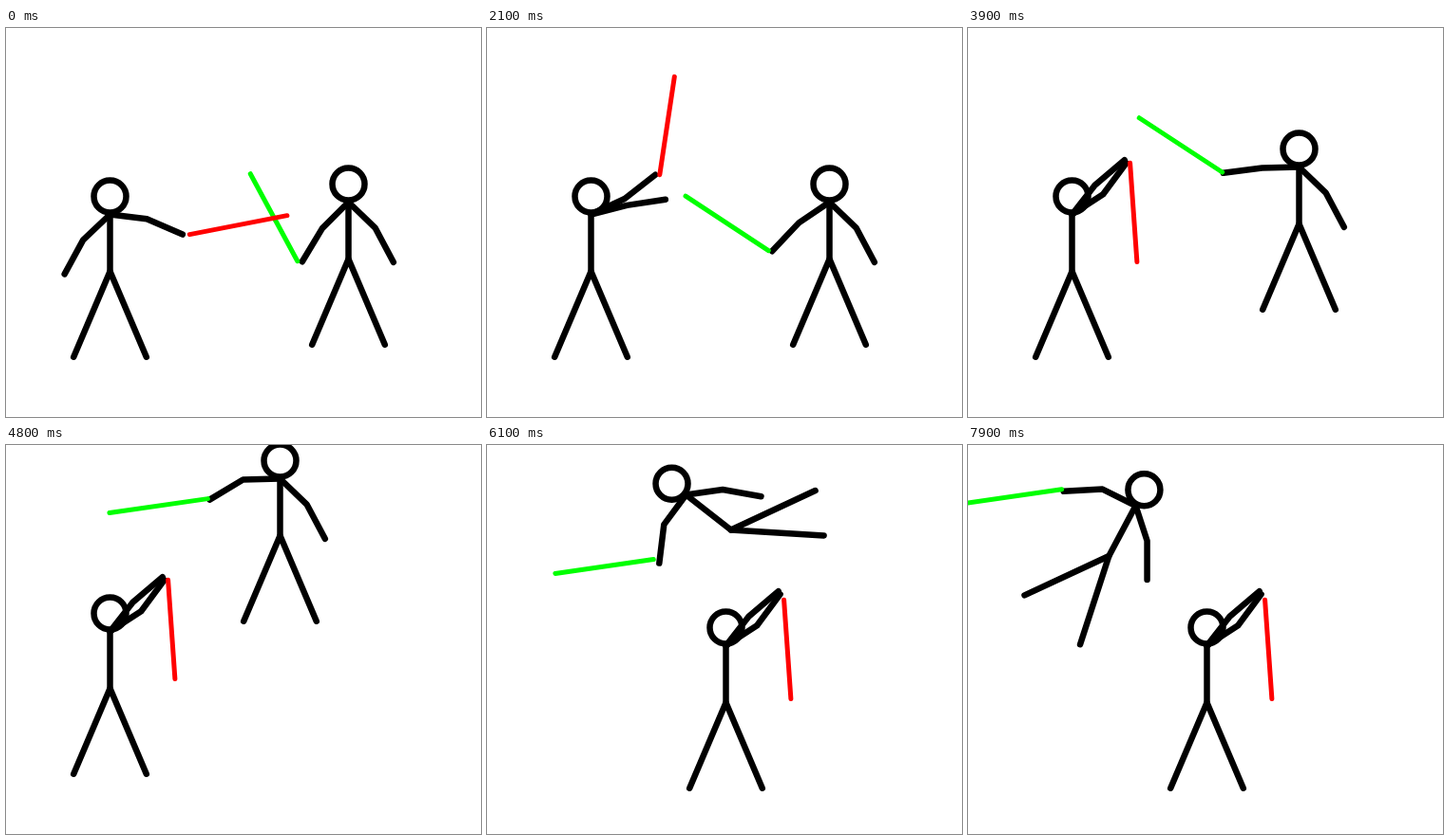
These frames come from a looping animation (500x410 px, 8 s). An HTML page with a canvas:

```html
<!DOCTYPE html>
<html>
<head>
<meta charset="utf-8">
<style>
html, body { margin: 0; width: 100%; height: 100%; overflow: hidden; background: #fff; }
canvas { display: block; }
</style>
</head>
<body>
<canvas id="stage" width="500" height="410"></canvas>
<script>
const ctx = document.getElementById('stage').getContext('2d');
const LOOP = 8000, STEP = 100;
const TORSO = 60, LEG = 98, UPPER_ARM = 39, FOREARM = 41, BLADE = 104.5;

// Angles are in degrees, counter-clockwise from the right.
function polar([x, y], angle, length) {
  const a = angle * Math.PI / 180;
  return [x + Math.cos(a) * length, y - Math.sin(a) * length];
}

function line(color, width, ...points) {
  ctx.strokeStyle = color;
  ctx.lineWidth = width;
  ctx.beginPath();
  points.forEach(p => ctx.lineTo(...p));
  ctx.stroke();
}

const limb = (...points) => line('#000', 6.5, ...points);

function arm(neck, upper, lower) {
  const elbow = polar(neck, upper, UPPER_ARM);
  const hand = polar(elbow, lower, FOREARM);
  limb(neck, elbow, hand);
  return hand;
}

function body(neck, spin = 0, leftLeg = -113, rightLeg = -67) {
  const hip = polar(neck, spin - 90, TORSO);
  limb(neck, hip);
  limb(polar(hip, leftLeg, LEG), hip, polar(hip, rightLeg, LEG));
  ctx.beginPath();
  ctx.arc(...polar(neck, spin + 90, 19), 17, 0, 2 * Math.PI);
  ctx.stroke();
}

function sword(color, [x, y], dx, dy, angle) {
  const hilt = [x + dx, y + dy];
  line(color, 5, hilt, polar(hilt, angle, BLADE));
}

function draw(t) {
  const ramp = (from, to) => Math.min(1, Math.max(0, (t - from) / (to - from)));
  ctx.setTransform(1, 0, 0, 1, 0, 0);
  ctx.fillStyle = '#fff';
  ctx.fillRect(0, 0, 500, 410);
  ctx.translate(0.5, 0.5);
  ctx.lineCap = ctx.lineJoin = 'round';

  // Left fighter: both hands rise, then a slide under the jumper.
  const raise = ramp(1300, 2300), slide = ramp(5300, 6000);
  const leftNeck = [109 + 142 * slide, 196 + 15 * slide];
  body(leftNeck);
  arm(leftNeck, 223.5 + 188.5 * raise, 241.5 + 159 * raise);
  const leftHand = arm(leftNeck, -7 + 40 * raise, -23.5 + 77 * raise);

  // Right fighter: parry, leap, lean forward, roll and land flying.
  const parry = ramp(0, 900), lift = ramp(1900, 2700), lower = ramp(3300, 4300);
  const leap = ramp(3600, 4800), lean = ramp(4800, 5200), drift = ramp(4900, 5400);
  const roll = ramp(6250, 6800), flip = ramp(6800, 7900);
  const rightNeck = [
    360 + 8 * ramp(3300, 3600) - 80 * leap - 79 * drift - 77 * roll + 44 * flip,
    183 - 148 * leap + 17 * drift + 96 * roll - 84.5 * flip + 60 * Math.sin(Math.PI * flip)
  ];
  const spin = 52 * lean + 90 * roll + 190 * flip;
  body(rightNeck, spin, -113 + 109.5 * lean + 208.5 * flip, -67 + 92 * lean + 227 * flip);
  arm(rightNeck, spin - 44, spin - 62);
  const rightHand = arm(rightNeck, spin + 225 - 43.5 * lift,
    spin + 239 + 12.5 * parry - 99.5 * lift + 59 * lower);

  sword('#0f0', rightHand,
    -5 + 5 * lift - 2 * lower - 4 * lean + 7 * roll - 3 * flip,
    -0.5 - 0.5 * lower - 3 * lean + 7 * roll - 5 * flip,
    118.3 + 92.7 * parry - 61.5 * ramp(900, 1300) - 11.5 * lift
      - 43 * ramp(3100, 3400) + 93.2 * ramp(3400, 4300));
  sword('#f00', leftHand, 7.5 - 3.5 * raise, 6 * slide,
    11 - 31 * ramp(0, 700) + 67.3 * ramp(900, 1300) + 42.7 * raise
      - 90 * ramp(2300, 2900) - 86 * ramp(3100, 3700));
}

const start = performance.now();
function tick() {
  const t = (performance.now() - start) % LOOP;
  draw(Math.floor(t / STEP) * STEP);
  requestAnimationFrame(tick);
}
tick();
</script>
</body>
</html>
```
